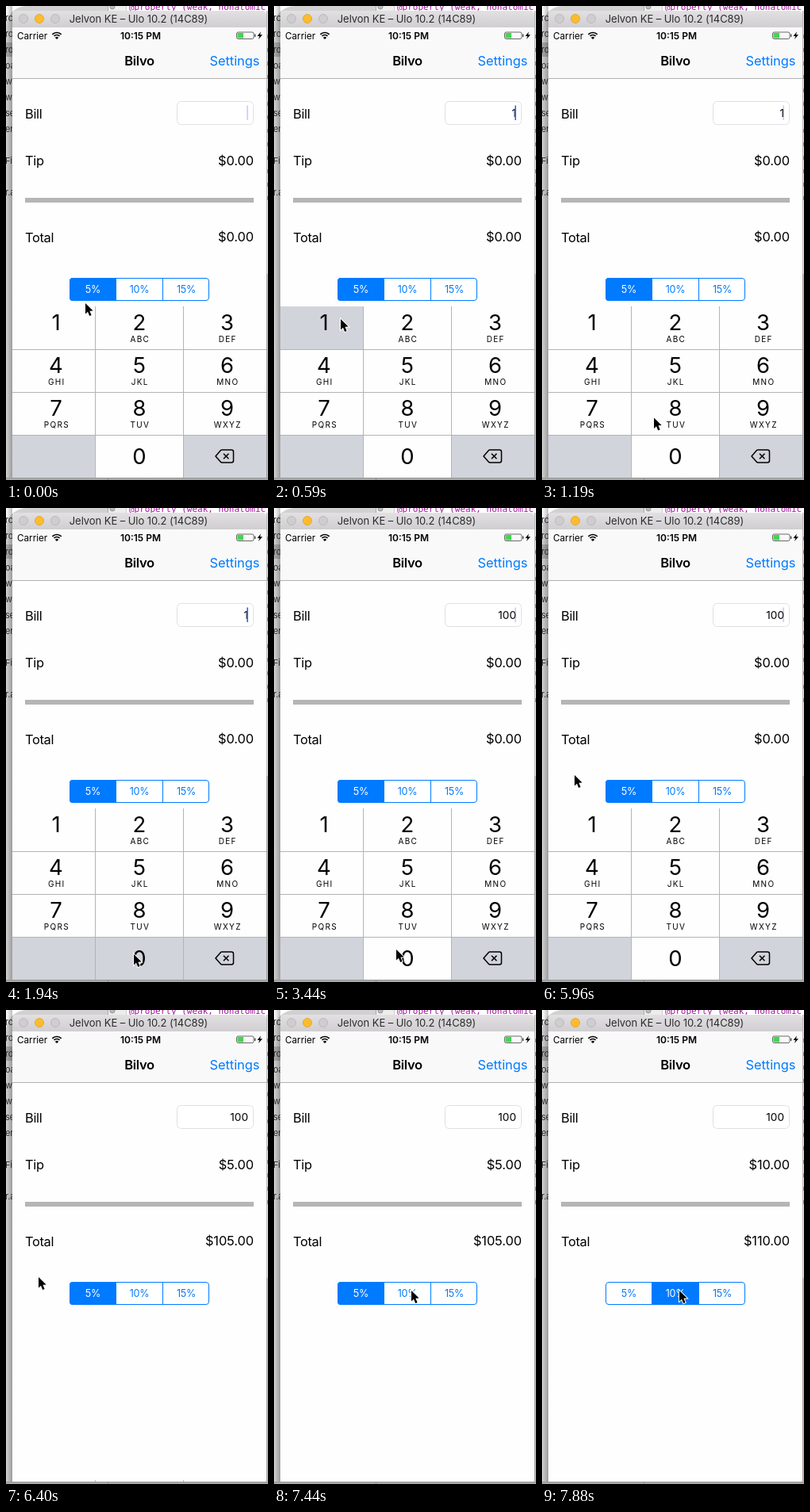
Animation, 330 px wide and 598 px high, one loop 8 s. Source, as an HTML page with a canvas:

```html
<!DOCTYPE html>
<html lang="en">
<head>
<meta charset="utf-8">
<title>Tip calculator</title>
<style>
  html, body { margin: 0; width: 100%; height: 100%; overflow: hidden; background: #fff; }
  canvas { display: block; width: 330px; height: 598px; }
</style>
</head>
<body>
<canvas id="stage"></canvas>
<script>
const W = 330, H = 598, LOOP = 8000, STEP = 148.8;
const BLUE = '#007aff', KEY_GRAY = '#d1d4db', LINE = '#b4b4b6';
const SANS = 'Inter, Roboto, sans-serif', MONO = '"DejaVu Sans Mono", monospace';
const canvas = document.getElementById('stage');
const ctx = canvas.getContext('2d');
const dpr = window.devicePixelRatio || 1;
canvas.width = W * dpr;
canvas.height = H * dpr;

// Steps at which the caret is half faded; each one flips it on or off.
const CARET_FADES = [0, 3, 8, 11, 20, 23, 26, 30, 33, 36, 40];

// Pointer path: step, x, y
const PATH = [
  [0, 100, 375], [3, 84, 395], [6, 84, 395], [9, 161, 563],
  [22, 161, 563], [23, 154, 557], [26, 41, 341], [27, 41, 341],
  [30, 170, 361], [31, 169, 360], [35, 169, 360], [40, 41, 337],
  [44, 41, 337], [50, 173, 354], [54, 173, 354]
];

const KEYS = ['', 'ABC', 'DEF', 'GHI', 'JKL', 'MNO', 'PQRS', 'TUV', 'WXYZ'];
const COL_MID = [63, 168, 278.5];

function rect(x, y, w, h, color) {
  ctx.fillStyle = color;
  ctx.fillRect(x, y, w, h);
}

function round(x, y, w, h, r) {
  ctx.beginPath();
  ctx.roundRect(x, y, w, h, r);
}

function disc(x, y, r, fill, edge) {
  ctx.beginPath();
  ctx.arc(x, y, r, 0, Math.PI * 2);
  ctx.fillStyle = fill;
  ctx.fill();
  ctx.strokeStyle = edge;
  ctx.lineWidth = 0.8;
  ctx.stroke();
}

function poly(points, close) {
  ctx.beginPath();
  points.forEach(([x, y]) => ctx.lineTo(x, y));
  if (close) ctx.closePath();
}

function label(str, x, y, size, opts = {}) {
  const { align = 'left', color = '#000', weight = 400, gap = -0.02, font = SANS } = opts;
  ctx.font = `${weight} ${size}px ${font}`;
  ctx.letterSpacing = `${gap * size}px`;
  ctx.textAlign = align;
  ctx.fillStyle = color;
  ctx.fillText(str, x, y);
}

function gradient(x0, y0, x1, y1, from, to) {
  const g = ctx.createLinearGradient(x0, y0, x1, y1);
  g.addColorStop(0, from);
  g.addColorStop(1, to);
  return g;
}

function drawDesktop() {
  rect(0, 0, W, H, '#fff');
  round(0, 0, 140, 640, [26, 0, 0, 0]);
  ctx.fillStyle = '#d2d1d2';
  ctx.fill();
  rect(128, 0, 24, 6, '#ededed');
  rect(128, 0, 1, 6, '#aaa');
  rect(151, 0, 1, 6, '#ccc');
  disc(134, 1, 3, '#bbb', '#888');
  label('@property (weak, nonatomic', 155, 5, 11, { color: '#a3189b', gap: 0, font: MONO });

  // Sidebar and editor slivers on either side of the window
  rect(0, 46, 8, 18, '#aaa9aa');
  const rows = ['rc', 'ro', 'ro', 'oa', 'wC', 'wC', 'se', 'en', '', 'File', '', 'r.a'];
  rows.forEach((s, i) => label(s, -1, 19 + i * 20, 11, { color: '#333' }));
  rect(0, 0, 8, H, gradient(0, 0, 8, 0, 'rgba(0,0,0,0)', 'rgba(0,0,0,.25)'));
  rect(328, 6, 2, 332, '#e2e2e4');
  for (let i = 0; i < 13; i++) {
    rect(329, 36 + i * 17, 1, 5, i % 3 ? '#8c8c96' : '#a878b4');
  }
  rect(328, 338, 2, 260, '#c0c0c1');
  rect(328, 6, 1, 592, 'rgba(0,0,0,.2)');
  rect(0, 595, W, 3, gradient(0, 595, 0, 598, '#979797', '#b4b4b4'));
  rect(128, 596, 1, 2, '#868686');
}

function drawWindow() {
  round(8, 6, 320, 40, [5, 5, 0, 0]);
  ctx.fillStyle = gradient(0, 6, 0, 27, '#e2e0e2', '#d0ced0');
  ctx.fill();
  disc(22, 16, 5.5, '#cfcdcf', '#b5b3b5');
  disc(42, 16, 5.5, '#fdbc2f', '#dfa023');
  disc(62, 16, 5.5, '#cfcdcf', '#b5b3b5');
  label('Jelvon KE – Ulo 10.2 (14C89)', 167, 21, 13, { align: 'center', color: '#2c2c2c', gap: -0.005 });

  rect(8, 27, 320, 568, '#fefefe');
  rect(8, 27, 320, 64, '#f9f9f9');
  rect(8, 91, 320, 1, '#b2b2b2');
}

function drawStatus() {
  label('Carrier', 14, 42, 11.7, { gap: 0 });
  label('10:15 PM', 169.5, 42, 12, { align: 'center', weight: 600, gap: 0 });

  ctx.strokeStyle = '#000';
  ctx.lineWidth = 1.7;
  [8, 5].forEach(r => {
    ctx.beginPath();
    ctx.arc(64, 41.5, r, -Math.PI * 0.75, -Math.PI * 0.25);
    ctx.stroke();
  });
  ctx.beginPath();
  ctx.moveTo(64, 42);
  ctx.arc(64, 42, 3, -Math.PI * 0.75, -Math.PI * 0.25);
  ctx.fillStyle = '#000';
  ctx.fill();

  round(290.5, 33, 21.5, 8.5, 2);
  ctx.strokeStyle = '#444';
  ctx.lineWidth = 0.8;
  ctx.stroke();
  rect(291.5, 34, 7.5, 6.5, '#43d551');
  rect(313, 35.5, 1.3, 3.5, '#444');
  poly([[321, 32.5], [316.5, 38], [319.3, 38], [318, 42], [323, 36.3], [320, 36.3]], true);
  ctx.fillStyle = '#000';
  ctx.fill();
}

function caretAlpha(k) {
  if (CARET_FADES.includes(k)) return 0.3;
  const flips = CARET_FADES.filter(f => f < k).length;
  return flips % 2 ? 0 : 1;
}

function drawForm(k) {
  const bill = k < 4 ? '' : k < 14 ? '1' : k < 17 ? '10' : '100';
  const tip = k < 43 ? 0 : k < 52 ? 5 : 10;
  const total = tip ? 100 + tip : 0;
  const size = 16.4;
  const money = (n, y) => label('$' + n.toFixed(2), 312, y, size, { align: 'right', gap: -0.006 });

  label('Bilvo', 168, 75, 16.6, { align: 'center', weight: 600 });
  label('Settings', 256.5, 75, size, { color: BLUE, gap: -0.002 });
  label('Bill', 24, 142, size);
  label('Tip', 24, 201, size);
  label('Total', 24, 298, size);
  money(tip, 201);
  money(total, 297);
  rect(24, 242, 288, 6, '#b5b5b5');

  round(215.5, 120.5, 96, 29, 5);
  ctx.fillStyle = '#fff';
  ctx.fill();
  ctx.strokeStyle = '#e0e0e0';
  ctx.lineWidth = 1;
  ctx.stroke();
  label(bill, 305, 140, 13.6, { align: 'right', gap: 0 });
  ctx.globalAlpha = caretAlpha(k);
  rect(303.3, 125.5, 1.7, 18.5, '#3f6bea');
  ctx.globalAlpha = 1;
}

function drawSegments(k) {
  const edges = [80, 138.5, 197.5, 256];
  const chosen = k < 52 ? 0 : 1;
  ctx.save();
  round(80, 343, 176, 29, 4);
  ctx.fillStyle = '#fff';
  ctx.fill();
  ctx.clip();
  if (k === 51) rect(138.5, 343, 59, 29, '#d9ebff');
  rect(edges[chosen], 343, edges[chosen + 1] - edges[chosen], 29, BLUE);
  rect(138, 343, 1, 29, BLUE);
  rect(197, 343, 1, 29, BLUE);
  ctx.restore();
  round(80.5, 343.5, 175, 28, 3.5);
  ctx.strokeStyle = BLUE;
  ctx.lineWidth = 1;
  ctx.stroke();
  ['5%', '10%', '15%'].forEach((s, i) => {
    label(s, [109.5, 168, 227][i], 362, 12.6, {
      align: 'center', color: i === chosen ? '#fff' : BLUE
    });
  });
}

function drawBackspace() {
  ctx.strokeStyle = '#000';
  ctx.lineWidth = 1.5;
  ctx.lineJoin = 'round';
  ctx.beginPath();
  ctx.moveTo(264, 568);
  ctx.lineTo(270.5, 560.5);
  ctx.arcTo(271, 560, 273, 560, 2);
  ctx.arcTo(286.5, 560, 286.5, 568, 2.5);
  ctx.arcTo(286.5, 576, 273, 576, 2.5);
  ctx.arcTo(271, 576, 264, 568, 2);
  ctx.closePath();
  ctx.stroke();
  poly([[274, 564.7], [280.5, 571.3]]);
  ctx.stroke();
  poly([[280.5, 564.7], [274, 571.3]]);
  ctx.stroke();
}

function drawKeyboard(k) {
  if (k > 43) return;
  const press1 = k === 3 || k === 4;
  const press0 = k === 13 || k === 16;
  ctx.save();
  ctx.beginPath();
  ctx.rect(8, 378, 320, 217);
  ctx.clip();
  ctx.translate(0, k === 43 ? 214 : 0);

  rect(8, 379, 320, 216, '#fefefe');
  rect(8, 541, 320, 54, KEY_GRAY);
  if (!press0) rect(113, 541, 111, 54, '#fefefe');
  if (press1) rect(8, 379, 105, 54, KEY_GRAY);
  [433, 487, 541].forEach(y => rect(8, y, 320, 1, LINE));
  [112, 223].forEach(x => rect(x, 379, 1, 216, LINE));

  KEYS.forEach((letters, i) => {
    const x = COL_MID[i % 3], y = 409 + 54 * Math.floor(i / 3);
    label(String(i + 1), x, y, 27.5, { align: 'center', gap: 0 });
    label(letters, x + 0.8, y + 15, 10, { align: 'center', gap: 0.13 });
  });
  label('0', 168, 578, 27.5, { align: 'center', gap: 0 });
  drawBackspace();
  ctx.restore();
}

function pointerAt(k) {
  const i = PATH.findIndex(p => p[0] > k) - 1;
  const [k0, x0, y0] = PATH[i], [k1, x1, y1] = PATH[i + 1];
  const u = (k - k0) / (k1 - k0), e = u * u * (3 - 2 * u);
  return [x0 + (x1 - x0) * e, y0 + (y1 - y0) * e];
}

function drawPointer(k) {
  const [x, y] = pointerAt(k);
  ctx.save();
  ctx.translate(x, y);
  poly([[0, 0], [0, 13.5], [3, 10.7], [5.2, 16], [7.6, 15], [5.4, 9.8], [9.6, 9.6]], true);
  ctx.lineJoin = 'miter';
  ctx.strokeStyle = '#fff';
  ctx.lineWidth = 2;
  ctx.stroke();
  ctx.fillStyle = '#000';
  ctx.fill();
  ctx.restore();
}

function draw(now) {
  const k = Math.floor((now % LOOP + 8) / STEP);
  ctx.setTransform(dpr, 0, 0, dpr, 0, 0);
  drawDesktop();
  drawWindow();
  drawStatus();
  drawForm(k);
  drawSegments(k);
  drawKeyboard(k);
  drawPointer(k);
}

const start = performance.now();
function tick() {
  draw(performance.now() - start);
  requestAnimationFrame(tick);
}
tick();
</script>
</body>
</html>
```
